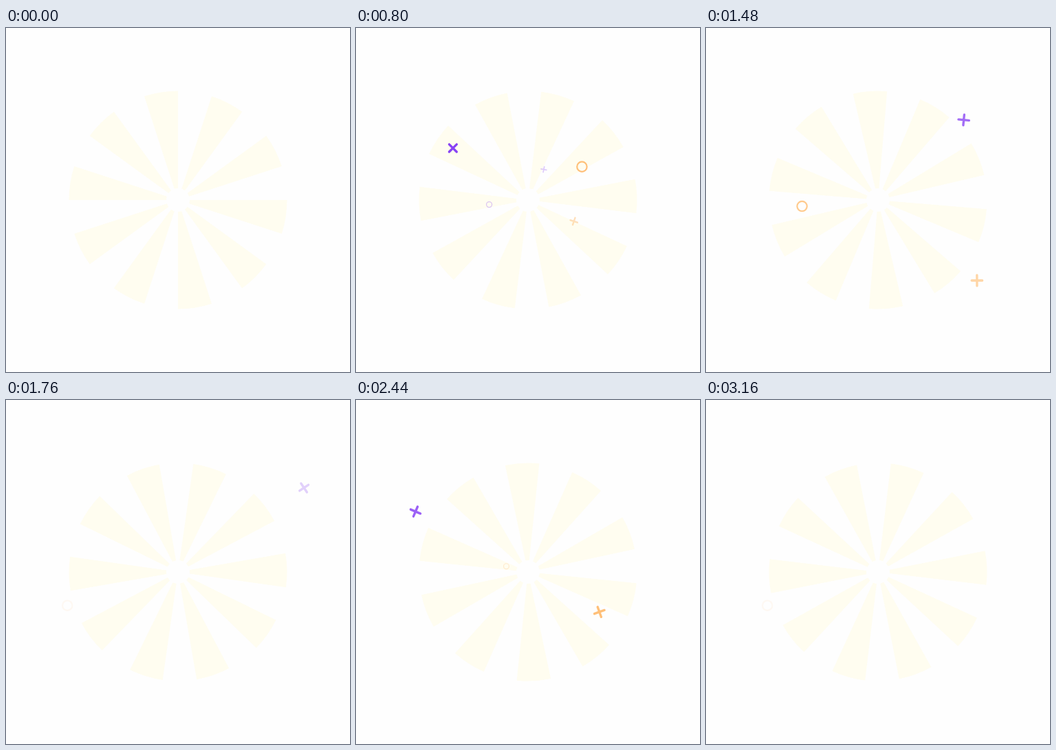
An HTML page with a canvas for the animation above (3360 ms loop, 500 px wide and 500 px high).

```html
<!DOCTYPE html>
<html>
<head>
<meta charset="utf-8">
<style>
html, body { margin: 0; width: 100%; height: 100%; overflow: hidden; background: #fefefe; }
canvas { display: block; }
</style>
</head>
<body>
<canvas width="500" height="500"></canvas>
<script>
const ctx = document.querySelector('canvas').getContext('2d');
const LOOP = 3360, STEP = 40, REPLAY = 1400;
const RAD = Math.PI / 180;
const PURPLE = '#8843f4', ORANGE = '#ffc078';

// Each piece flies from the centre along a quadratic curve: bend is its control point,
// end its last point, turn its first and last angle, seen the share of life spent growing.
const pieces = [
  { draw: cross, color: PURPLE, born: 480, life: 840, bend: [-180, -142], end: [-171, -61], turn: [105, -52], seen: 0.25 },
  { draw: ring, color: ORANGE, born: 480, life: 760, bend: [100, -84], end: [164, -44] },
  { draw: cross, color: PURPLE, born: 560, life: 1280, bend: [50, -133], end: [201, -122], turn: [45, -135] },
  { draw: cross, color: ORANGE, born: 480, life: 1260, bend: [149, 54], end: [150, 157], turn: [70, -132], again: true },
  { draw: ring, color: PURPLE, born: 480, life: 960, bend: [-84, -10], end: [-177, 96], seen: 0.6 },
  { draw: ring, color: ORANGE, born: 860, life: 920, bend: [-82, -34], end: [-165, 52], again: true },
  { draw: cross, color: PURPLE, born: 1870, life: 840, bend: [-184, -156], end: [-182, -44], turn: [49, -122], seen: 0.25 }
];

function ring() {
  ctx.lineWidth = 2.2;
  ctx.arc(0, 0, 7.2, 0, 2 * Math.PI);
}

function cross() {
  ctx.lineWidth = 3.4;
  ctx.moveTo(-7.7, 0);
  ctx.lineTo(7.7, 0);
  ctx.moveTo(0, -7.7);
  ctx.lineTo(0, 7.7);
}

function drawRays(t) {
  ctx.save();
  ctx.translate(250, 250);
  ctx.rotate(t * 0.0762 * RAD);
  ctx.fillStyle = '#fffdf0';
  for (let i = 0; i < 10; i++) {
    ctx.beginPath();
    ctx.arc(0, 0, 158.5, 0, 18 * RAD);
    ctx.arc(0, 0, 17, 18 * RAD, 0, true);
    ctx.fill();
    ctx.rotate(36 * RAD);
  }
  ctx.restore();
}

function drawPiece({ draw, color, born, life, bend, end, turn = [0, 0], seen = 0.36 }, t) {
  const u = (t - born) / life;
  if (u <= 0 || u >= 1) return;
  const along = i => 2 * u * (1 - u) * bend[i] + u * u * end[i];
  const size = Math.min(1, u / seen);
  const fade = 1 - Math.max(0, (u - 0.3) / 0.7) ** 3;
  ctx.save();
  ctx.translate(250.6 + along(0), 250.4 + along(1));
  ctx.rotate((turn[0] + (turn[1] - turn[0]) * u) * RAD);
  ctx.scale(size, size);
  ctx.globalAlpha = size * size * fade;
  ctx.strokeStyle = color;
  ctx.lineCap = 'round';
  ctx.beginPath();
  draw();
  ctx.stroke();
  ctx.restore();
}

const begin = performance.now();
function frame() {
  const t = Math.floor((performance.now() - begin) % LOOP / STEP) * STEP;
  ctx.fillStyle = '#fefefe';
  ctx.fillRect(0, 0, 500, 500);
  drawRays(t);
  for (const piece of pieces) {
    drawPiece(piece, t);
    if (piece.again) drawPiece(piece, t - REPLAY);
  }
  requestAnimationFrame(frame);
}
frame();
</script>
</body>
</html>
```
